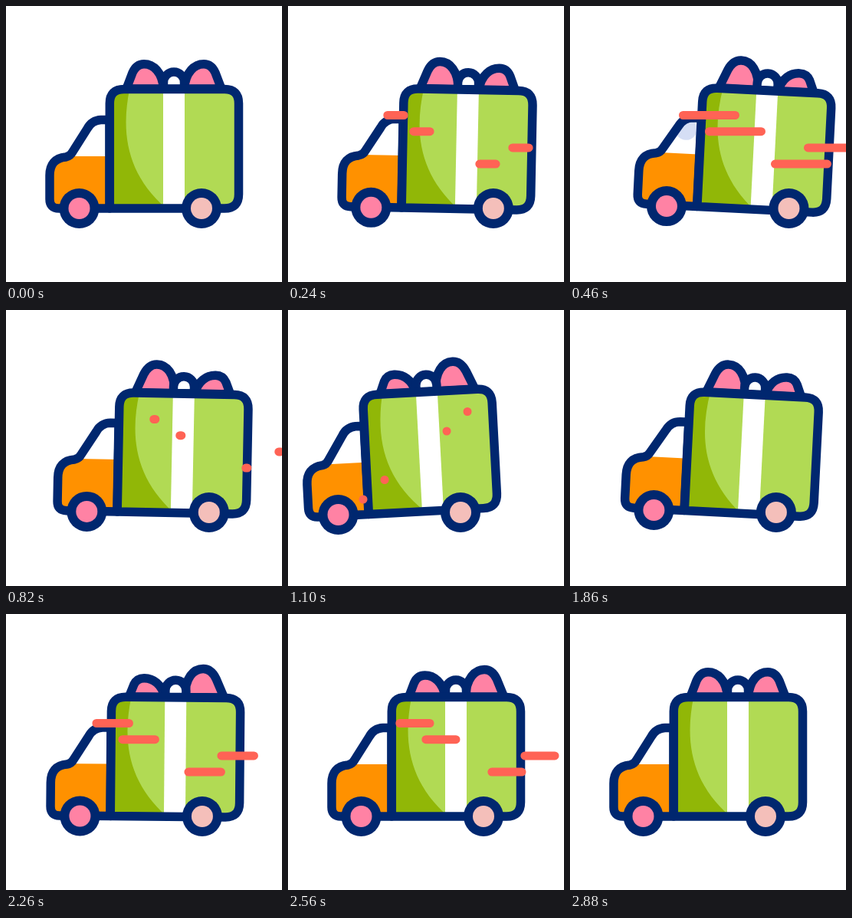
Write an HTML page that moves like this. It is 360x360 px and loops after 2900 ms.

```html
<!DOCTYPE html>
<html lang="en">
<head>
<meta charset="utf-8">
<title>Gift delivery truck</title>
<style>
html, body { margin: 0; width: 100%; height: 100%; overflow: hidden; background: #fff; }
svg { display: block; width: 360px; height: 360px; }
.line { stroke: #00276f; stroke-width: 11.5; stroke-linejoin: round; stroke-linecap: round; }
.ear { fill: #ff82a4; vector-effect: non-scaling-stroke; }
#streaks { stroke: #ff6355; stroke-width: 11; stroke-linecap: round; }
</style>
</head>
<body>
<svg viewBox="0 0 360 360">
  <defs>
    <path id="cab" d="M135 148.5H124Q112 149 106 160L87 190Q84 196 78 197Q57 199 57 221V252Q57 264 69 264H135Z"/>
    <path id="box" d="M135.3 264V127Q135.3 108.5 154 108.5H285Q303.5 108.5 303.5 127V245.5Q303.5 264 285 264Z"/>
    <path id="ear" class="ear line" d="M157 108L165 87Q170 75.7 180 75.7C192 75.7 204 86 205.5 108Z"/>
    <clipPath id="inCab"><use href="#cab"/></clipPath>
    <clipPath id="inBox"><use href="#box"/></clipPath>
  </defs>
  <g id="truck">
    <g id="body">
      <use id="earL" href="#ear"/>
      <use id="earR" href="#ear"/>
      <path class="line" fill="#fff" d="M205.5 108V99.5A13.5 13.5 0 0 1 232.5 99.5V108Z"/>
      <g clip-path="url(#inCab)">
        <path fill="#fff" d="M50 140H140V196H50Z"/>
        <circle id="glint" cx="116" cy="164" r="14" fill="#d5def5"/>
        <path fill="#ff9100" d="M50 196H140V270H50Z"/>
      </g>
      <use href="#cab" class="line" fill="none"/>
      <g clip-path="url(#inBox)">
        <path fill="#b1da54" d="M130 100H310V270H130Z"/>
        <path fill="#91b707" d="M130 100H163C149 160 155 217 209 264H130Z"/>
        <path fill="#fff" d="M205 100H233V270H205Z"/>
      </g>
      <use href="#box" class="line" fill="none"/>
    </g>
    <g id="front"><circle cx="95.5" cy="264" r="26" fill="#00276f"/><circle cx="95.5" cy="264" r="14" fill="#ff82a4"/></g>
    <circle cx="255" cy="264" r="26" fill="#00276f"/><circle cx="255" cy="264" r="14" fill="#f4bfba"/>
    <path id="streaks"/>
  </g>
</svg>
<script>
const LOOP = 2900;
const $ = id => document.getElementById(id);
const set = (id, value) => $(id).setAttribute('transform', value);
const clamp = (v, lo, hi) => Math.min(hi, Math.max(lo, v));
const cosine = p => (1 - Math.cos(Math.PI * p)) / 2;
const easeOut = p => 1 - (1 - p) ** 2;

// A value that starts at 0, swings through the given peaks and settles back to 0.
function swing(times, peaks, settle = cosine) {
  const values = [0, ...peaks, 0], stops = [0, ...times];
  return t => {
    const i = stops.findIndex(s => s > t);
    if (i < 0) return 0;
    const ease = i === times.length ? settle : cosine;
    const p = (t - stops[i - 1]) / (stops[i] - stops[i - 1]);
    return values[i - 1] + (values[i] - values[i - 1]) * ease(p);
  };
}
const drive = swing([560, 1215, 1690, 2400], [33, -35, 24], easeOut);
const tilt = swing([600, 1160, 1720, 2450], [3.3, -3.2, 3.2]);
const sway = swing([640, 1300, 1800, 2320, 2710], [1.8, -1.8, 1.8, -1.8]);

// Two alternating gusts of four streaks; split is the gap between the pairs.
const gusts = [
  { xs: [117, 151, 280, 237], top: 142.5, step: 21.2, split: 0 },
  { xs: [264, 237, 156, 128], top: 132.5, step: 25.5, split: 38 }
];

// Each streak grows rightwards, then its left end catches up.
function streaks(t) {
  const first = 140, every = 960, life = 690, grow = 320, hold = 40, length = 68;
  const age = (t - first) % every;
  if (age < 0 || age >= life) return '';
  const { xs, top, step, split } = gusts[Math.floor((t - first) / every) % 2];
  const head = length * clamp(age / grow, 0, 1);
  const tail = length * clamp((age - grow - hold) / (life - grow - hold), 0, 1);
  return xs.map((x, i) =>
    `M${x + tail} ${top + step * i + (i > 1 ? split : 0)}H${x + head + 0.01}`).join('');
}

// The ears lean together while one stretches and the other squashes.
function poseEar(id, x, side, lean) {
  const s = lean * side;
  const sx = side * (1 + 0.05 * s), sy = 0.95 + 0.2 * s + 0.05 * (1 - s * s);
  set(id, `translate(${x} 108) skewX(${-5 * lean}) scale(${sx} ${sy}) translate(-180 -108)`);
}

function draw(now) {
  const t = now % LOOP;
  const angle = tilt(t), lean = clamp(sway(t), -1, 1);
  set('truck', `translate(${drive(t)} 0)`);
  set('body', `rotate(${angle} 183 264)`);
  set('front', `translate(0 ${-angle})`);
  poseEar('earL', 180, 1, lean);
  poseEar('earR', 258, -1, lean);
  $('glint').style.display = t >= 400 && t < 540 ? '' : 'none';
  $('streaks').setAttribute('d', streaks(t));
}

let start;
function frame(now) {
  start ??= now;
  draw(now - start);
  requestAnimationFrame(frame);
}
draw(0);
requestAnimationFrame(frame);
</script>
</body>
</html>
```
